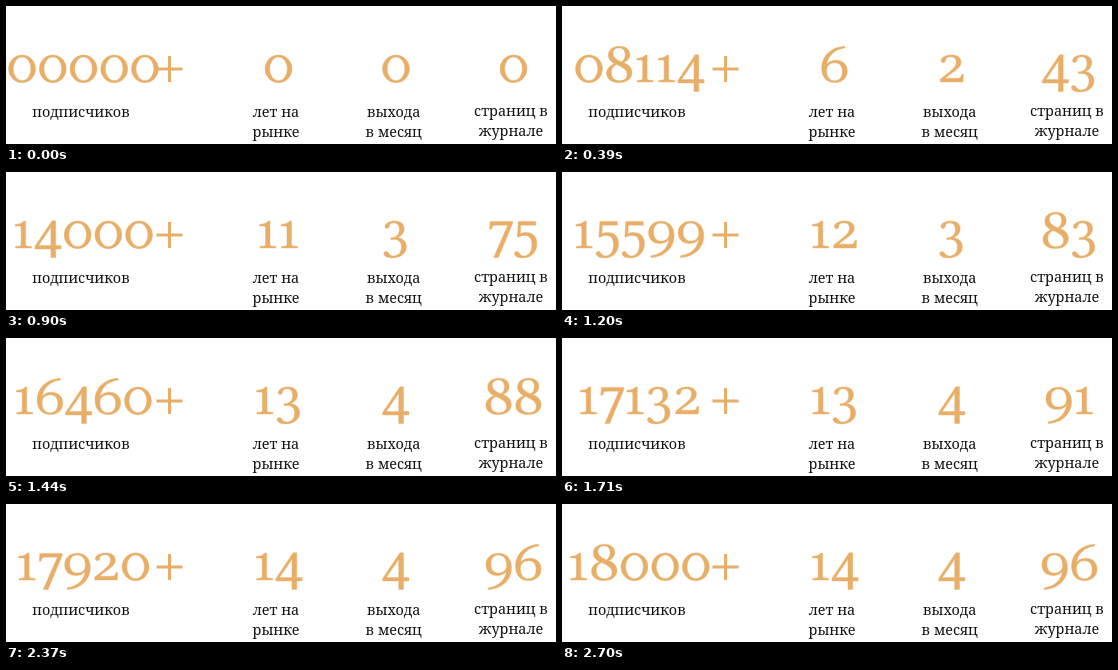
Animation of 550x138 px, one loop 2730 ms. Source, as an HTML page:

```html
<!DOCTYPE html>
<html lang="ru">
<head>
<meta charset="utf-8">
<title>Журнал в цифрах</title>
<style>
  html, body { margin: 0; width: 100%; height: 100%; overflow: hidden; background: #fff; }
  svg { display: block; width: 550px; height: 138px; }
  .num { fill: #e8ae68; fill-rule: evenodd; }
  #counters { stroke: #e8ae68; stroke-width: .4; }
  .label { font: 14.4px "Noto Serif", Georgia, serif; text-anchor: middle; fill: #111; }
</style>
</head>
<body>
<svg viewBox="0 0 550 138">
  <g id="counters" class="num"></g>
  <path class="num" d="M150.5 61.5H162V50H165V61.5H176.5V64.5H165V76H162V64.5H150.5Z"/>
  <g id="labels" class="label"></g>
</svg>
<script>
const STEP = 30, LAST = 90, BASELINE = 76;

const ellipse = (cx, cy, rx, ry) =>
  `M${cx - rx} ${cy}a${rx} ${ry} 0 1 1 ${2 * rx} 0a${rx} ${ry} 0 1 1 ${-2 * rx} 0Z`;

const six = 'M25.2-35.8V-34C14.6-32.8 8.4-26 7-17.8C9.4-20.4 12.6-21.8 16.4-21.8C23-21.8 27.6-17.6 27.6-11C27.6-4 22.4 .6 15 .6C7 .6 2-4.8 2-14C2-25.6 11-35 25.2-35.8Z' +
  'M15.2-1.2C19.8-1.2 22.6-4.6 22.6-10.4C22.6-16 19.8-19.2 15-19.2C10-19.2 6.9-16 6.9-11.6C6.9-5 10-1.2 15.2-1.2Z';

// Old-style figures: [advance, outline], baseline at y = 0
const GLYPHS = [
  [30.7, ellipse(15.35, -13.2, 13.5, 13.9) + ellipse(15.35, -13.2, 8.9, 11.8)],
  [21.5, 'M3 0V-1.4Q8.4-1.8 8.5-3.2V-20.5Q8.5-22 7-22H2.6V-23.5Q9-24 11.5-27H13V-3.2Q13-1.8 19-1.4V0Z'],
  [27.9, 'M2.4 0V-2.8C8-7.2 11-9.3 14-12.4C17-15.2 18.2-17.2 18.2-19.8C18.2-23.2 16.2-25.2 12.6-25.2C9.6-25.2 8-24.2 7.6-22.6C7.3-21 7-19.3 5.2-19.3C3.8-19.3 3-20.2 3-21.4C3-24.6 7.6-27.1 13.4-27.1C19.4-27.1 23-24.4 23-20C23-15.6 19.6-13 15-9.8C12-7.7 9.5-5.8 7.2-3.8H20C22-3.8 22.8-4.4 23.6-7.4H25.4L24.9 0Z'],
  [27.6, 'M8.6-8.4V-10.2C14-10.4 17.2-13.4 17.2-18.6C17.2-22.8 15-25.2 11.6-25.2C9-25.2 7.6-24.2 7.2-22.4C6.9-20.8 6.4-19.4 4.8-19.4C3.5-19.4 2.8-20.2 2.8-21.4C2.8-24.6 7-27.1 12.6-27.1C18.4-27.1 22-24.2 22-19.6C22-15.2 19.4-12 14.8-10.4C20.6-9.8 24.2-6.4 24.2-1.2C24.2 5.6 18.4 9.9 10 9.9C5.2 9.9 1.6 8.2 1.6 5.6C1.6 4.2 2.4 3.4 3.8 3.4C5.2 3.4 6 4.6 6.8 5.8C7.6 7 8.8 7.9 11.2 7.9C16.2 7.9 19.2 4.4 19.2-1C19.2-6 16.4-8.6 11.6-8.6Z'],
  [28.2, 'M16.8 9.5V1H.8V-1.6L18-27.2H21.6V-2.4H27V1H21.6V9.5ZM16.8-2.4V-20.8L4.4-2.4Z'],
  [25.9, 'M5.2-26.6H22.6V-22.8H7.6L7.2-14.2C8.8-15 10.8-15.4 12.8-15.4C19.6-15.4 23.8-11.4 23.8-4.6C23.8 4.2 18 9.9 9.6 9.9C4.8 9.9 1.4 8.2 1.4 5.6C1.4 4.2 2.2 3.4 3.6 3.4C5 3.4 5.8 4.6 6.6 5.8C7.4 7 8.6 7.9 10.6 7.9C15.6 7.9 18.8 3.6 18.8-3.6C18.8-9.4 16.2-12.6 11.6-12.6C9.2-12.6 7.2-12 5-10.6L4.2-11.2Z'],
  [29.6, six],
  [25.1, 'M1.6-18.8L2.2-26.6H24.6V-24.4L10.4 9.6H5.6L19.8-22.8H6.6C4.8-22.8 4.2-21.6 3.4-18.8Z'],
  [29.8, 'M15-35.8C21.4-35.8 25.4-32.6 25.4-27.6C25.4-23.8 23-21 19-19.4C24.6-17.4 27.6-14 27.6-9.4C27.6-3.4 22.6 .6 14.8 .6C7.2 .6 2.2-3 2.2-8.8C2.2-13 5-16.2 10.2-18.2C6-20.4 4-23.2 4-27C4-32.2 8.4-35.8 15-35.8Z' +
    'M17.2-20.2C19.6-21.8 20.8-24 20.8-27.4C20.8-31.6 18.6-34 14.8-34C11-34 8.6-32 8.6-28.6C8.6-25 11.2-22.8 17.2-20.2Z' +
    'M12-17.4C8.6-15.6 7-13 7-9.4C7-4.4 10-1.2 15-1.2C19.8-1.2 22.8-3.6 22.8-7.4C22.8-11.6 19.4-14.4 12-17.4Z'],
  [29.6, six, 'translate(29.6 -26.2) rotate(180)']
];

const COUNTERS = [
  { x: 77.5, end: 18000, pad: 5, labelX: 75, y: 111, lines: ['подписчиков'] },
  { x: 272.5, end: 14, pad: 1, labelX: 270, y: 111, lines: ['лет на', 'рынке'] },
  { x: 390, end: 4, pad: 1, labelX: 387.7, y: 111, lines: ['выхода', 'в месяц'] },
  { x: 507.5, end: 96, pad: 1, labelX: 505, y: 110, lines: ['страниц в', 'журнале'] }
];

// cubic-bezier(1/6, 1/6, 0, 1)
function ease(u) {
  let lo = 0, hi = 1;
  for (let i = 0; i < 40; i++) {
    const s = (lo + hi) / 2;
    if (s * (1 - s) ** 2 / 2 + s ** 3 < u) lo = s; else hi = s;
  }
  return 1 - (1 - hi) ** 2 * (1 + 1.5 * hi);
}

function figures(text, center) {
  const digits = [...text].map(d => GLYPHS[d]);
  let x = center - digits.reduce((sum, g) => sum + g[0], 0) / 2;
  return digits.map(([advance, d, turn = '']) => {
    const path = `<path d="${d}" transform="translate(${x.toFixed(2)} ${BASELINE}) ${turn}"/>`;
    x += advance;
    return path;
  }).join('');
}

const counters = document.getElementById('counters');
document.getElementById('labels').innerHTML = COUNTERS.map(c =>
  c.lines.map((line, i) => `<text x="${c.labelX}" y="${c.y + i * 20}">${line}</text>`).join('')
).join('');

let shown = -1;
function draw(now) {
  const step = Math.floor(Math.max(0, now - start) / STEP) % (LAST + 1);
  if (step !== shown) {
    shown = step;
    const k = ease(step / LAST);
    counters.innerHTML = COUNTERS.map(c => {
      const text = String(Math.round(c.end * k)).padStart(c.pad, '0');
      return `<g role="img" aria-label="${text}">${figures(text, c.x)}</g>`;
    }).join('');
  }
  requestAnimationFrame(draw);
}
const start = performance.now();
draw(start);
</script>
</body>
</html>
```
